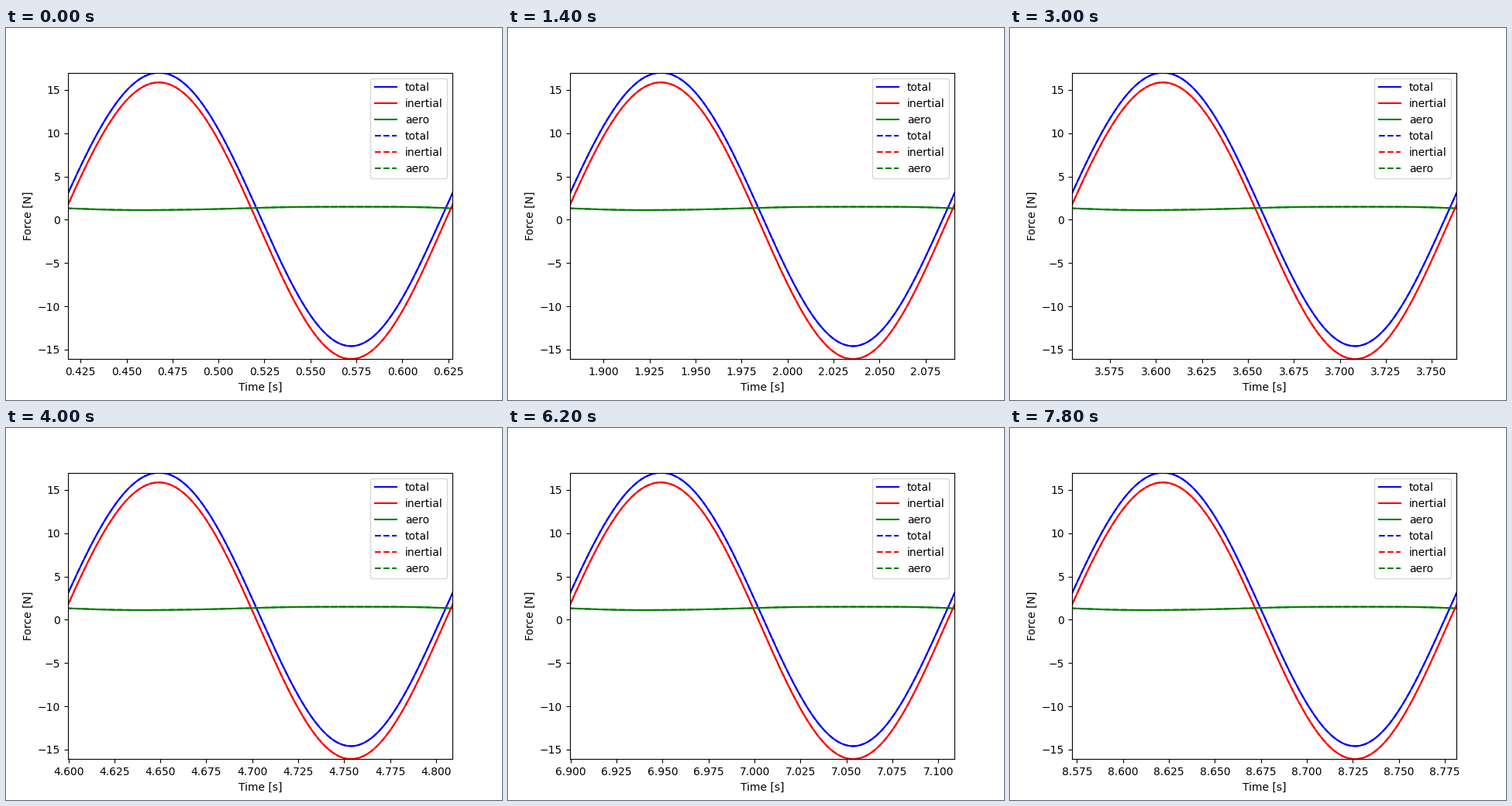
A matplotlib script that plays this animation: 640x480 px, repeating every 8000 ms.

```python
import numpy as np
import matplotlib.pyplot as plt
from matplotlib.animation import FuncAnimation

PERIOD = 0.20908       # seconds of data per cycle, one cycle per view
FIRST_CYCLE = 2
FRAMES = 40
STEP_MS = 200
PEAK = 0.2363          # cycle fraction at which the inertial force peaks


def inertial_force(u):
    a = 2 * np.pi * (u - PEAK)
    return 15.985 * np.cos(a) - 0.235 * np.cos(2 * a) + 0.12


def aero_force(u):
    a = 2 * np.pi * u
    return (1.335 - 0.2 * np.sin(a) - 0.03 * np.cos(a)
            - 0.02 * np.sin(2 * a) + 0.02 * np.cos(2 * a)
            - 0.015 * np.sin(3 * a))


phase = np.linspace(-0.05, 1.05, 441)
inertial = inertial_force(phase)
aero = aero_force(phase)
curves = [("total", "blue", inertial + aero),
          ("inertial", "red", inertial),
          ("aero", "green", aero)]

fig, ax = plt.subplots(figsize=(6.4, 4.8), dpi=100)
lines = []
for style in ("-", "--"):
    for label, color, force in curves:
        line, = ax.plot(phase, force, style, color=color, label=label)
        lines.append(line)

ax.set_ylim(-16.1, 17.0)
ax.set_xlabel("Time [s]")
ax.set_ylabel("Force [N]")
ax.legend(loc="upper right")


def update(i):
    cycle = FIRST_CYCLE + i
    for line in lines:
        line.set_xdata((cycle + phase) * PERIOD)
    ax.set_xlim(cycle * PERIOD, (cycle + 1) * PERIOD)
    return lines


anim = FuncAnimation(fig, update, frames=FRAMES, interval=STEP_MS,
                     init_func=lambda: update(0), repeat=True,
                     repeat_delay=0, blit=False)
plt.show()
```
